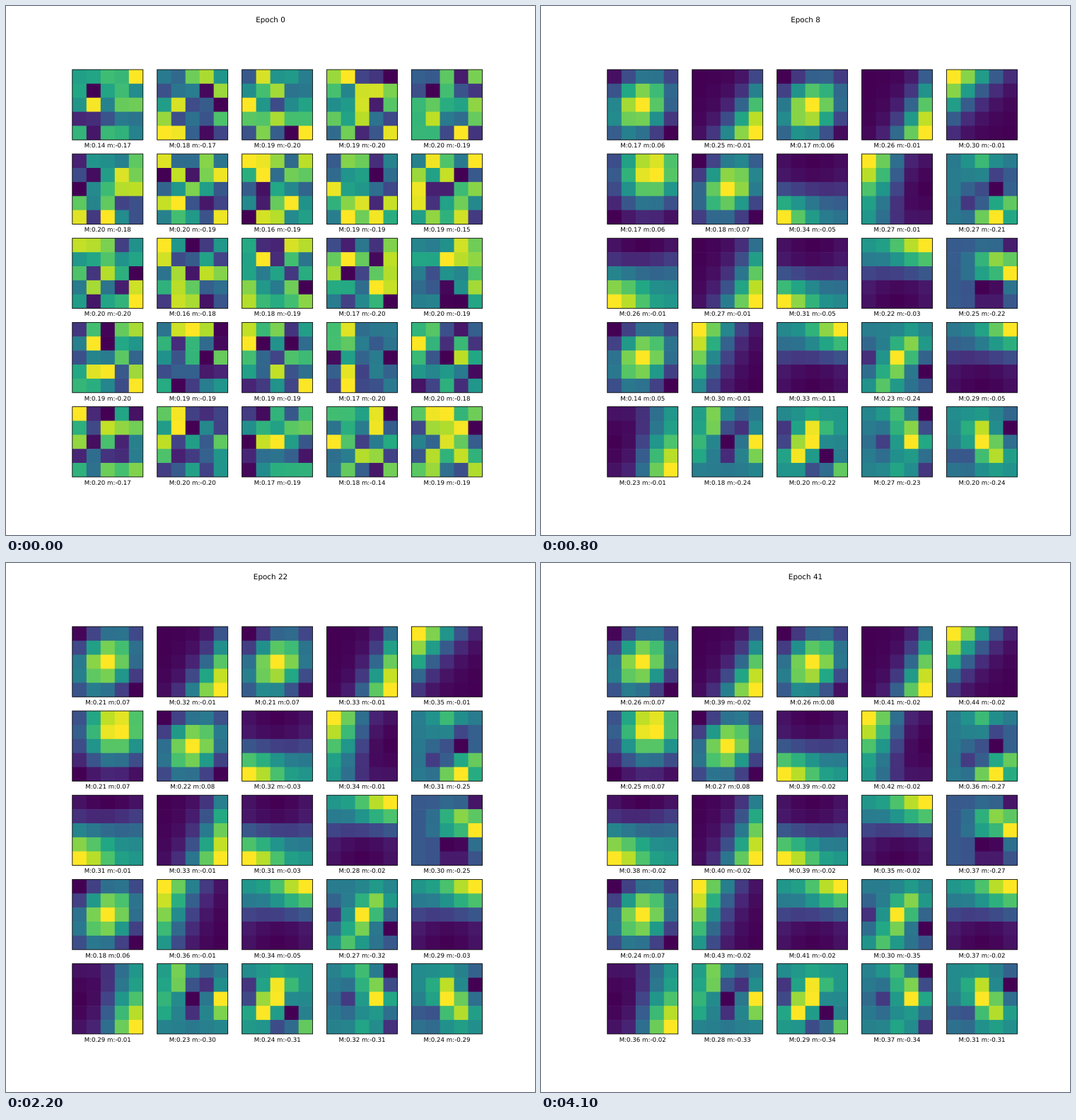
These frames come from a looping animation (748x748 px, 4.2 s). An HTML page:

```html
<!DOCTYPE html>
<html lang="en">
<head>
<meta charset="utf-8">
<title>Filter training</title>
<style>
  html, body { margin: 0; width: 100%; height: 100%; overflow: hidden; background: #fff; }
  svg { display: block; width: 748px; height: 748px; }
  text { font-family: "DejaVu Sans", sans-serif; text-anchor: middle; text-rendering: geometricPrecision; }
</style>
</head>
<body>
<svg id="stage" viewBox="0 0 748 748"></svg>
<script>
const SIZE = 748, EPOCHS = 42, STEP = 100;
const SETTLED = 3, MIDDLE = 14, LAST = EPOCHS - 1;
const LEFT = 0.125 * SIZE + 0.3, TOP = 0.12 * SIZE + 0.2;
const W = 0.775 * SIZE / 5.8, H = 0.77 * SIZE / 5.8;
const VIRIDIS = [
  [68, 1, 84], [72, 36, 117], [65, 68, 135], [53, 95, 141], [42, 120, 142], [33, 145, 140],
  [34, 168, 132], [68, 191, 112], [122, 209, 81], [189, 223, 38], [253, 231, 37]
];

const svg = document.getElementById('stage');
const tiles = [];
const lerp = (a, b, t) => a + (b - a) * t;
const smooth = t => t * t * (3 - 2 * t);

function add(name, attrs) {
  const el = document.createElementNS('http://www.w3.org/2000/svg', name);
  for (const k in attrs) el.setAttribute(k, attrs[k]);
  svg.appendChild(el);
  return el;
}

function color(v) {
  const p = Math.min(9.999, Math.max(0, v * 10)), i = Math.floor(p);
  return `rgb(${VIRIDIS[i].map((a, k) => Math.round(lerp(a, VIRIDIS[i + 1][k], p - i)))})`;
}

function normalise(list) {
  const lo = Math.min(...list), hi = Math.max(...list);
  return list.map(v => (v - lo) / (hi - lo));
}

function random(seed) {
  return () => {
    seed = (seed + 0x6D2B79F5) | 0;
    let t = Math.imul(seed ^ (seed >>> 15), 1 | seed);
    t = (t + Math.imul(t ^ (t >>> 7), 61 | t)) ^ t;
    return ((t ^ (t >>> 14)) >>> 0) / 4294967296;
  };
}

// Kernel shapes: (column, row, early) -> weight; early fades from 1 to 0.
const blob = (cx, cy, dx = 0, dy = 0, b = 0.2, d = 0.12) => (x, y, early) => {
  const u = x - cx - dx * early, v = y - cy - dy * early;
  return Math.exp(-b * (u * u + v * v) - d * u * v);
};

// Diagonal slope that leans toward a side as training goes on.
const ramp = (lean, mid, steep, flip = false) => (x, y, early) => {
  const p = lean - 0.1 * early, u = (p * x + (1 - p) * y) / 4;
  return 1 / (1 + Math.exp(-steep * ((flip ? 1 - u : u) - mid)));
};

const SIDES = {
  bottom: (x, y) => [y, x],
  top: (x, y) => [4 - y, 4 - x],
  left: (x, y) => [4 - x, y],
  right: (x, y) => [x, 4 - y]
};

// Bright along one side, half as bright at its far end.
const edge = (side, near, far, corner = 0) => (x, y, early) => {
  const [depth, along] = SIDES[side](x, y), s = smooth(depth / 4), a = along / 4;
  return lerp(s ** near, 0.5 * s ** far, smooth(a)) - 0.05 * Math.sin(Math.PI * a)
    + corner * early * Math.exp(-Math.hypot(4 - depth, along));
};
const flat = (side, corner) => edge(side, 2.1, 1.6, corner);
const upright = side => edge(side, 1.6, 2.4);

const peaks = (...list) => {
  const f = (x, y) => list.reduce((sum, [px, py, a]) =>
    sum + a * Math.exp(-1.1 * ((x - px) ** 2 + (y - py) ** 2)), 0.4);
  f.rough = true;
  return f;
};

// top: maximum at the settled, middle and last epoch; low: minimum at the settled and last one.
function tile(shape, top, low = [-0.8, -1.6]) {
  const n = tiles.length;
  const x0 = LEFT + (n % 5) * W * 1.2, y0 = TOP + Math.floor(n / 5) * H * 1.2;
  const rnd = random(n * 97 + 11), cells = [], noise = [];
  for (let j = 0; j < 5; j++) for (let i = 0; i < 5; i++) {
    noise.push(40 * rnd() - 20);
    cells.push(add('rect', {
      x: x0 + i * W / 5, y: y0 + j * H / 5,
      width: W / 5 + (i < 4 ? 0.6 : 0), height: H / 5 + (j < 4 ? 0.6 : 0)
    }));
  }
  add('rect', { x: x0, y: y0, width: W, height: H, fill: 'none', stroke: '#000', 'stroke-width': 0.85 });
  const label = add('text', { x: x0 + W / 2, y: y0 + H + 10.8, 'font-size': 8.657 });
  tiles.push({ shape, top, low, cells, label, noise });
}

const title = add('text', { x: SIZE / 2, y: 22.7, 'font-size': 10.389 });

tile(blob(1.92, 2.03, -0.35, 0), [16, 18, 26], [5, 7]);
tile(ramp(0.62, 0.73, 10), [22, 28, 39]);
tile(blob(1.98, 2.17, -0.4, 0.25), [16, 18, 26], [5, 8]);
tile(ramp(0.68, 0.75, 10), [24, 29, 41]);
tile(ramp(0.53, 0.76, 8, true), [29, 31, 44]);

tile(blob(2.62, 0.65, 0.1, 0.15, 0.16, 0.03), [16, 19, 25], [5, 7]);
tile(blob(2.03, 1.98, 0.4, -0.4), [17, 20, 27], [6, 8]);
tile(flat('bottom', 1.5), [39, 28, 39], [-7, -2]);
tile(upright('left'), [25, 30, 42]);
tile(peaks([2.6, 4, 0.8], [4, 3, 0.45], [3.2, 1.8, -0.6], [1.5, 3, -0.4], [2, 0, 0.32]),
  [26, 28, 36], [-18, -27]);

tile(edge('bottom', 1.25, 0.7), [25, 28, 38]);
tile(ramp(0.68, 0.74, 8), [25, 29, 40]);
tile(flat('bottom', 0.5), [34, 27, 39], [-6, -2]);
tile(flat('top'), [20, 24, 35], [-4, -2]);
tile(peaks([4, 1.7, 0.65], [3, 1, 0.3], [2, 1.6, 0.3], [2.5, 3.3, -0.4], [4, 0, -0.25]),
  [25, 26, 37], [-19, -27]);

tile(blob(1.98, 2.02), [13, 15, 24], [4, 7]);
tile(ramp(0.7, 0.72, 7, true), [28, 32, 43]);
tile(flat('top', 0.5), [35, 31, 41], [-15, -2]);
tile(peaks([2, 2.3, 0.65], [3, 1, 0.4], [4, 3, -0.45], [1, 4, 0.32], [0, 2, -0.3]),
  [20, 26, 30], [-19, -35]);
tile(flat('top', 1.2), [33, 25, 37], [-7, -2]);

tile(upright('right'), [21, 26, 36]);
tile(peaks([1, 0.5, 0.6], [0.3, 2.4, 0.35], [2, 2.4, -0.55], [2.6, 1, -0.45], [4, 2.3, 0.8]),
  [17, 20, 28], [-20, -33]);
tile(peaks([2, 1.4, 0.55], [1.2, 2.7, 0.6], [0, 1.5, -0.5], [3, 3, -0.55], [2, 4, -0.28], [4, 4, 0.3]),
  [19, 21, 29], [-17, -34]);
tile(peaks([3, 1.6, 0.7], [2, 0, 0.25], [4, 0.4, -0.55], [1, 2, -0.28], [4, 4, -0.32], [2.5, 4, 0.2]),
  [24, 30, 37], [-18, -34]);
tile(peaks([2, 1.5, 0.65], [2.8, 2.8, 0.5], [4, 1, -0.55], [0.6, 3.2, -0.35]),
  [19, 21, 31], [-21, -31]);

function maxAt({ top: [a, b, c], noise }, epoch) {
  if (epoch < SETTLED) return lerp(Math.max(...noise), a, epoch / SETTLED);
  if (epoch < MIDDLE) return lerp(a, b, (epoch - SETTLED) / (MIDDLE - SETTLED));
  return lerp(b, c, ((epoch - MIDDLE) / (LAST - MIDDLE)) ** 0.9);
}

function minAt({ low: [a, b], noise }, epoch) {
  if (epoch < SETTLED) return lerp(Math.min(...noise), a, epoch / SETTLED);
  const ease = e => 1 - Math.exp(-(e - SETTLED) / 14);
  return lerp(a, b, ease(epoch) / ease(LAST));
}

function draw(epoch) {
  title.textContent = 'Epoch ' + epoch;
  const early = Math.exp(-Math.max(0, epoch - SETTLED) / 4);
  const fade = Math.max(0, 1 - epoch / SETTLED) ** 1.7;
  for (const t of tiles) {
    const mix = t.shape.rough ? 0.6 * Math.exp(-epoch / 2.5) : fade;
    const start = normalise(t.noise);
    const kernel = normalise(start.map((_, i) => t.shape(i % 5, Math.floor(i / 5), early)));
    const values = normalise(kernel.map((v, i) => lerp(v, start[i], mix)));
    t.cells.forEach((c, i) => c.setAttribute('fill', color(values[i])));
    const [hi, lo] = [maxAt(t, epoch), minAt(t, epoch)].map(v => (v / 100).toFixed(2));
    t.label.textContent = `M:${hi} m:${lo}`;
  }
}

const begin = performance.now();
let shown = -1;
function tick() {
  const epoch = Math.floor((performance.now() - begin) / STEP) % EPOCHS;
  if (epoch !== shown) draw(shown = epoch);
  requestAnimationFrame(tick);
}
tick();
</script>
</body>
</html>
```
